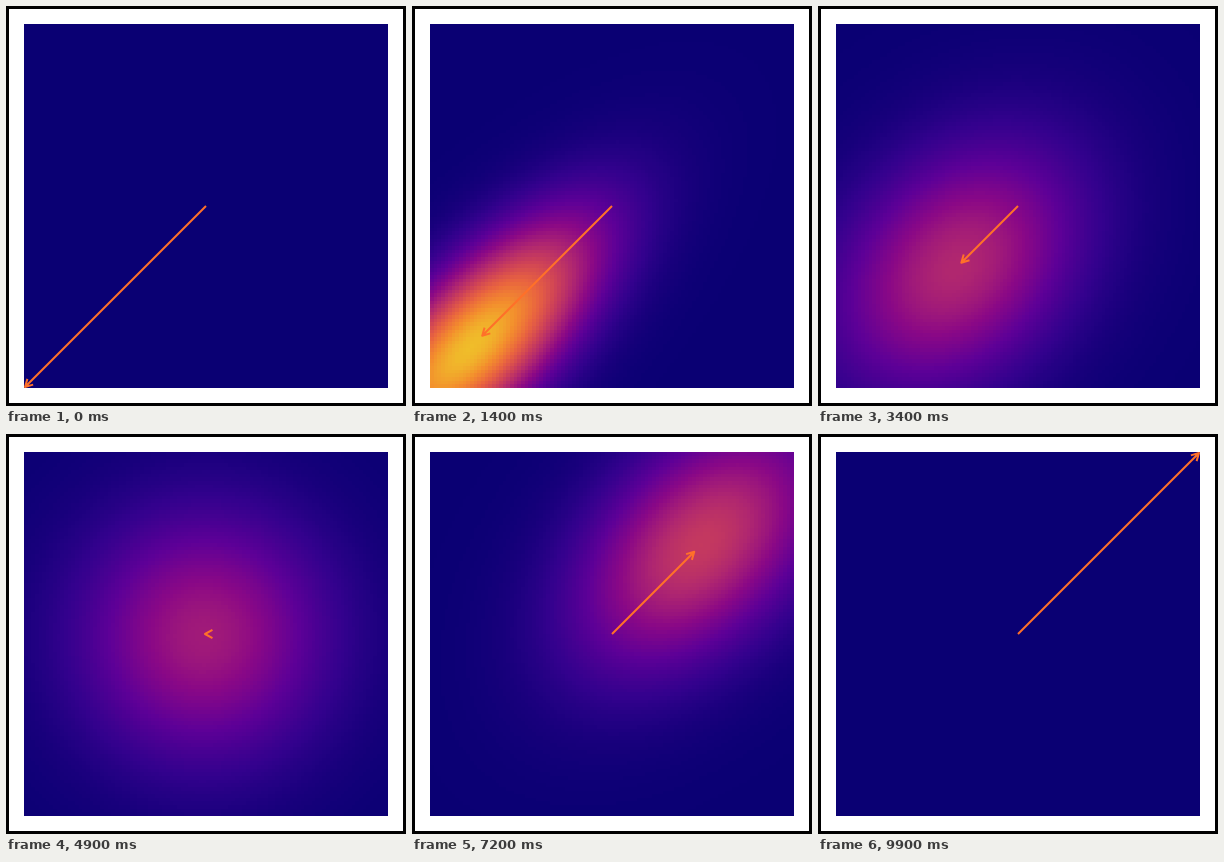
Write an HTML page with a canvas that moves like this. It is 400 by 400 pixels and loops after 10 s.

```html
<!DOCTYPE html>
<html lang="en">
<head>
<meta charset="utf-8">
<title>Density along a moving vector</title>
<style>
  html, body { margin: 0; width: 100%; height: 100%; overflow: hidden; background: #fff; }
  canvas { display: block; width: 400px; height: 400px; }
</style>
</head>
<body>
<canvas id="stage" width="400" height="400"></canvas>
<script>
const STEPS = 100, STEP_MS = 100;
const CELLS = 100, LEFT = 18, SIZE = 364, MID = 200, HALF = SIZE / 2;
const SIGMA = 0.48, BASE = 0.4;
const ARROW = '#ff7029';
const STOPS = [
  [10, 0, 115], [51, 1, 141], [93, 0, 151], [138, 8, 134], [175, 38, 112],
  [207, 67, 86], [233, 100, 63], [243, 141, 45], [240, 190, 42], [241, 245, 30]
];

const ctx = document.getElementById('stage').getContext('2d');
const grid = document.createElement('canvas');
grid.width = grid.height = CELLS;
const gridCtx = grid.getContext('2d');
const image = gridCtx.createImageData(CELLS, CELLS);

function colour(v) {
  const p = Math.min(Math.max(v, 0), 1) * (STOPS.length - 1);
  const i = Math.min(Math.floor(p), STOPS.length - 2);
  return STOPS[i].map((c, k) => c + (STOPS[i + 1][k] - c) * (p - i));
}
const palette = Array.from({ length: 256 }, (_, i) => colour(i / 255));

// Correlated normal density; it vanishes where the correlation reaches one.
function drawDensity(r) {
  const rho = Math.abs(r), flat = rho > 0.9999;
  const mean = 1.08 * r;
  const along = 2 * SIGMA * SIGMA * (1 + rho);
  const across = 2 * SIGMA * SIGMA * (1 - rho);
  const peak = flat ? 0 : BASE * Math.pow(1 - r * r, -1.1);
  for (let j = 0, o = 0; j < CELLS; j++) {
    const y = 1 - 2 * (j + 0.5) / CELLS - mean;
    for (let i = 0; i < CELLS; i++, o += 4) {
      const x = 2 * (i + 0.5) / CELLS - 1 - mean;
      const u = (x + y) * (x + y) / 2, w = (x - y) * (x - y) / 2;
      const v = flat ? 0 : peak * Math.exp(-u / along - w / across);
      const c = palette[Math.round(Math.min(v, 1) * 255)];
      image.data[o] = c[0];
      image.data[o + 1] = c[1];
      image.data[o + 2] = c[2];
      image.data[o + 3] = 255;
    }
  }
  gridCtx.putImageData(image, 0, 0);
  ctx.imageSmoothingEnabled = false;
  ctx.drawImage(grid, LEFT, LEFT, SIZE, SIZE);
}

function drawArrow(r) {
  const tiny = Math.abs(r) < 0.02;
  const reach = tiny ? Math.sign(r) : r * (HALF - 1);
  const x = MID + reach, y = tiny ? MID : MID - reach;
  const angle = (r < 0 ? Math.PI : 0) - (tiny ? 0 : Math.PI / 4);
  const barb = a => [x - 8.5 * Math.cos(angle + a), y - 8.5 * Math.sin(angle + a)];
  ctx.strokeStyle = ARROW;
  ctx.lineWidth = 2;
  ctx.lineJoin = 'round';
  ctx.beginPath();
  if (!tiny) {
    ctx.moveTo(MID, MID);
    ctx.lineTo(x, y);
  }
  ctx.moveTo(...barb(0.5));
  ctx.lineTo(x, y);
  ctx.lineTo(...barb(-0.5));
  ctx.stroke();
}

function draw(step) {
  const r = 2 * step / (STEPS - 1) - 1;
  ctx.fillStyle = '#000';
  ctx.fillRect(0, 0, 400, 400);
  ctx.fillStyle = '#fff';
  ctx.fillRect(3, 3, 394, 394);
  drawDensity(r);
  ctx.save();
  ctx.beginPath();
  ctx.rect(LEFT, LEFT, SIZE, SIZE);
  ctx.clip();
  drawArrow(r);
  ctx.restore();
}

let shown = -1;
const start = performance.now();
function tick() {
  const step = Math.floor(Math.max(0, performance.now() - start) / STEP_MS) % STEPS;
  if (step !== shown) draw(shown = step);
  requestAnimationFrame(tick);
}
tick();
</script>
</body>
</html>
```
